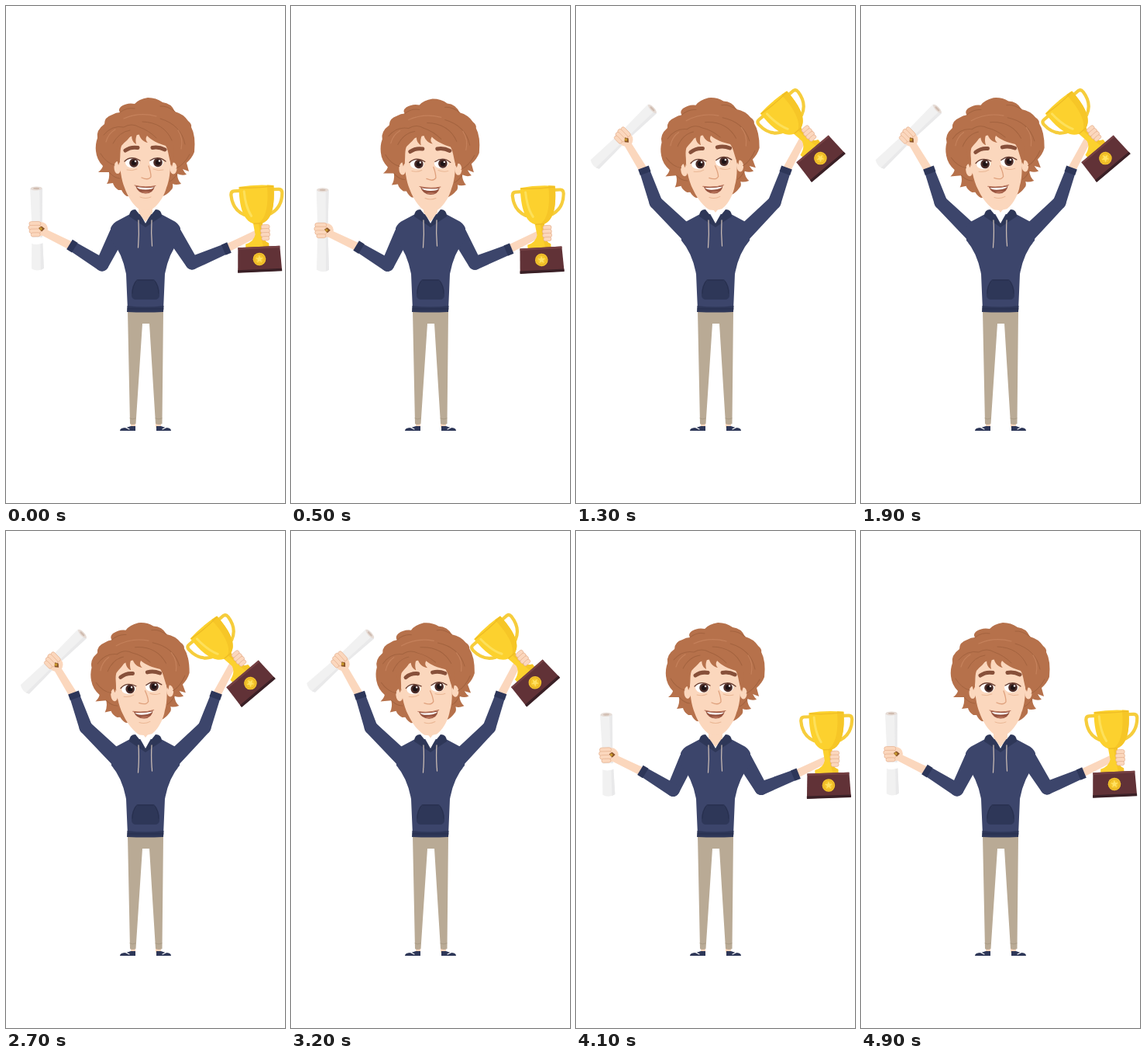
Recreate the animation shown at these times as an HTML page. Size 360 by 640 pixels, loop 5 s.

```html
<!DOCTYPE html>
<html lang="en">
<head>
<meta charset="utf-8">
<title>Celebration</title>
<style>
  html, body { margin: 0; width: 100%; height: 100%; overflow: hidden; background: #fff; }
  svg { display: block; width: 360px; height: 640px; }
  .skin { fill: #fbd7bd; }
  .cloth { fill: #3c456b; }
  .dark { fill: #2e3758; }
  .hair { fill: #b6714b; }
  .gold { fill: #fcd12e; }
  .line { fill: none; stroke-linecap: round; stroke-linejoin: round; }
  .cuff { stroke: #2d3659; stroke-width: 14.5; }
  .finger { fill: #fbd7bd; stroke: #e5b08f; stroke-width: .7; }
</style>
</head>
<body>
<svg viewBox="0 0 360 640">
  <g id="legs">
    <path class="skin" d="M161 536h6v7h-6zM193 536h7v7h-7z"/>
    <path fill="#b9aa95" d="M157 392H203L201.500 538Q197 540 193 538L185 409H176L167.500 538Q163 540 160 538Z"/>
    <path class="line" stroke="#a89983" stroke-width=".9" d="M160 531Q163 533 167 531M193 531Q197 533 201 531"/>
    <path class="dark" d="M147 547Q147 543 155 543L161 541H167V547ZM213 547Q213 543 206 543L200 541H194V547Z"/>
    <path class="line" stroke="#fff" stroke-width="1.100" d="M154 542.500L159 545M207 542.500L202 545"/>
  </g>

  <path id="wristL" class="skin"/>
  <path id="wristR" class="skin"/>
  <ellipse id="palmR" class="skin" cx="6" rx="9" ry="10"/>
  <g id="sleeves" class="cloth">
    <path id="upL"/><path id="foreL"/><path id="upR"/><path id="foreR"/>
  </g>
  <path id="cuffL" class="cuff"/>
  <path id="cuffR" class="cuff"/>

  <g id="torso">
    <path class="cloth" d="M160 268L145 276Q138 279 135 286L136 302Q150 318 155 345L157 392H203L205 345Q210 318 224 302L225 286Q222 279 215 276L200 268Z"/>
    <path class="dark" d="M156.500 386Q180 389 203.500 386L203 394Q180 395 156 394ZM169 352H191Q198 359 198 372Q198 378 192 378H168Q162 378 162 372Q162 359 169 352Z"/>
    <path class="line" stroke="#252d4b" stroke-width=".8" d="M168 354Q163 361 163 370M192 354Q197 361 197 370M170 353H190M157 390H203"/>
    <path class="dark" d="M159 271Q159 262 167 262L180 278L193 262Q201 262 201 271Q190 278 180 285Q170 278 159 271Z"/>
    <path fill="#fff" d="M170 262H190L180 280Z"/>
    <path id="neck" class="skin" d="M171 255H189V266L180 278L171 266Z"/>
    <path class="line" stroke="#c8bab3" stroke-width="1.300" d="M171 276Q172 294 170.500 311M188 276Q187 292 188.500 309"/>
  </g>

  <g id="head">
    <path class="hair" d="M156 245Q152 243 149 237L145 237Q139 233 138 228L130 229Q134 223 133 214L127 214L119 214Q124 210 125 206Q117 198 116 187Q115 178 118 170Q116 160 127 152Q127 143 137 140Q142 137 147 137Q144 133 149 129Q157 124 166 126Q171 120 183 118Q194 118 202 124Q213 125 218 136Q229 139 235 148Q240 152 239 156Q245 167 243 188Q240 196 233 202L236 213L228 210Q230 214 233 217Q227 219 221 216Q221 224 226 229Q219 231 215 229Q216 235 213 237Q208 243 202 245Z"/>
    <ellipse class="skin" cx="144" cy="208" rx="4.500" ry="8"/>
    <ellipse class="skin" cx="216" cy="209" rx="4.500" ry="7.500"/>
    <path class="skin" d="M147 180C146 205 148 222 153 234C158 248 166 258 172 262Q180 264 188 262C195 258 204 246 207 234C212 222 213 205 212 180C205 160 155 160 147 180Z"/>
    <path class="hair" d="M145 205C149 198 146 188 149 180C153 175 160 171 163 163C161 170 163 175 168 178C167 173 167 168 171 162C172 170 177 175 183 176C180 173 180 170 182 167C188 173 196 177 206 180C210 186 210 198 214 207C220 190 218 165 200 155C180 145 155 150 146 164C142 178 142 195 145 205Z"/>
    <path class="line" stroke="#a3633f" stroke-width="1" d="M147 137Q156 130 166 132M218 136Q208 128 199 129M126 166Q137 153 152 156Q162 150 172 156Q184 160 194 170M138 177Q146 162 160 160M176 149Q204 150 214 173M199 145Q226 153 231 178M122 190Q129 202 140 205M237 191Q230 204 220 209M133 214Q140 222 147 222M221 216Q216 224 211 226"/>
    <path class="line" stroke="#c5815b" stroke-width="1.200" d="M152 145Q172 136 194 142M129 175Q132 164 141 159M222 160Q229 170 226 184"/>
    <path class="line" stroke="#87503a" stroke-width="5" d="M154 186Q161 181 170 182.500M189 182.500Q197 181 205 185"/>
    <g id="eyeL">
      <ellipse cx="163" cy="202" rx="9" ry="6.300" fill="#fff"/>
      <circle cx="165" cy="202" r="5.800" fill="#4b2c28"/>
      <circle cx="165" cy="202" r="3.200" fill="#1f1416"/>
      <circle cx="167" cy="200" r="1.200" fill="#fff"/>
    </g>
    <use href="#eyeL" x="31" y="-.5"/>
    <path class="line" stroke="#6a3f32" stroke-width="1.300" d="M153 200Q161 192 173 199M186 199Q196 192 206 200"/>
    <path class="line" stroke="#eab795" stroke-width="1" d="M156 211Q163 213 169 210M190 210Q197 213 203 211M173 246Q180 249 187 246"/>
    <path class="line" stroke="#dfa17d" stroke-width="1.300" d="M184 206Q187 214 187 220Q184 225 175 221"/>
    <path fill="#96533f" d="M167 231.500Q180 234 192 232Q190 241.500 180 241.500Q170 241 167 231.500Z"/>
    <path fill="#fff" d="M168.500 233Q180 235 191 233.500Q189 236.500 180 236.500Q171 236.500 168.500 233Z"/>
    <path fill="#bb755c" d="M174 239.500Q180 238 187 239.500Q180 242 174 239.500Z"/>
    <path class="line" stroke="#b9745c" stroke-width="1" d="M166 231Q180 234.500 193 231.500"/>
  </g>

  <g id="scroll">
    <path fill="#f1f1f1" d="M-8 -52Q0 -56 8 -52L6.500 0L8 51Q0 56 -8 51L-6.500 0Z"/>
    <path fill="#e9e9ea" d="M4 -52L8 -52L6.500 0L8 51L4 53Z"/>
    <ellipse cy="-52" rx="7.500" ry="2.600" fill="#e6dcd6"/>
    <ellipse cy="-52" rx="4" ry="1.200" fill="#d0bcb0"/>
    <path id="gap" fill="#fff" d="M-9 11H9V18Q0 22 -9 18Z"/>
    <ellipse class="skin" cx="5" rx="9" ry="9"/>
    <g class="finger">
      <rect x="-10" y="-9.500" width="15" height="5.500" rx="2.700"/>
      <rect x="-11" y="-4.700" width="16" height="5.500" rx="2.700"/>
      <rect x="-10" y="0" width="15" height="5.500" rx="2.700"/>
      <rect x="-8" y="4.800" width="12" height="5" rx="2.500"/>
    </g>
    <path fill="#8a5328" d="M2 -1L6 -3.500L10 0L6 3.500Z"/>
    <circle cx="5" r="1.800" fill="#c99a2f"/>
  </g>

  <g id="trophy">
    <path class="line" stroke="#f6cd3c" stroke-width="4.200" d="M-21 -55H-29Q-33 -55 -33 -50Q-32 -31 -17 -24M21 -55H29Q33 -55 33 -50Q32 -31 17 -24"/>
    <path class="gold" d="M-22.500 -60Q0 -63 22.500 -60C23 -38 20 -17 6 -12L4 2Q6 11 13 14V19H-17V14Q-6 11 -4 2L-6 -12C-20 -17 -23 -38 -22.500 -60Z"/>
    <path fill="#f6c627" d="M14 -61L22.500 -60C23 -38 20 -17 6 -12L4 2Q6 11 13 14V19H6Q3 6 1 -12C13 -20 15 -42 14 -61Z"/>
    <path class="line" stroke="#fde05a" stroke-width="3" d="M-16 -54Q-15 -34 -8 -22"/>
    <path class="line" stroke="#efbd24" stroke-width="1.400" d="M-21 -59Q0 -57 21 -59M-5 -12H5"/>
    <path fill="#613237" d="M-27 18H27L28.500 50H-28.500Z"/>
    <path fill="#764144" d="M-27 18H27V20.500H-27Z"/>
    <path fill="#3a2026" d="M-28.500 47H28.500V50.500H-28.500Z"/>
    <circle cy="34" r="8.300" fill="#f5c62c"/>
    <circle class="line" cy="34" r="6.500" stroke="#e0a924" stroke-width=".8"/>
    <path id="star" fill="#ffe162"/>
    <g class="finger">
      <rect x="4" y="-10" width="11" height="5.600" rx="2.700"/>
      <rect x="3" y="-5" width="12" height="5.600" rx="2.700"/>
      <rect x="3" y="0" width="12" height="5.600" rx="2.700"/>
      <rect x="4" y="5" width="10" height="5.200" rx="2.500"/>
    </g>
  </g>
</svg>
<script>
const $ = id => document.getElementById(id);
const LOOP = 5000, STEP = 100, RAD = Math.PI / 180;
const SHOULDER = { L: [144, 293], R: [216, 293] };

// Turns elbow, wrist, grip into angle and length pairs.
function chain(start, points, wrap) {
  let [x, y] = start;
  return points.flatMap(([px, py]) => {
    const dx = px - x, dy = py - y;
    const deg = Math.atan2(dy, dx) / RAD;
    [x, y] = [px, py];
    return [wrap ? (deg + 360) % 360 : deg, Math.hypot(dx, dy)];
  });
}

// extra: scroll angle, trophy angle, head angle, head drop, scroll gap
const pose = (left, right, extra) =>
  [...chain(SHOULDER.L, left, true), ...chain(SHOULDER.R, right), ...extra];
const mix = (a, b, k) => a.map((v, i) => v + (b[i] - v) * k);

const rest = pose([[124, 333], [82, 307], [40, 287]],
                  [[240, 331], [288, 311], [325.5, 292]], [-1, -2.5, 0, 0, 1]);
const dip = pose([[127, 334], [86, 310], [42.5, 291]],
                 [[235, 332], [283, 314], [320, 295.5]], [-1.5, -2, 0, 1.5, 0]);
const up = pose([[103, 253], [87, 208], [61, 168.5]],
                [[256, 253], [272, 208], [293.5, 170]], [46, -40, -5, 0, 0]);
const lean = pose([[104, 254], [93, 208], [74.5, 164]],
                  [[255, 253], [269, 207], [288, 168]], [55, -46, -4, 1, 0]);

const keys = [
  [0, rest], [450, dip], [960, mix(dip, up, 1.04)], [1280, up], [3050, up],
  [3600, lean], [4120, mix(lean, rest, 1.02)], [4500, rest], [LOOP, rest]
];

function poseAt(t) {
  const i = keys.findIndex(([end], n) => n && t < end);
  const [t0, a] = keys[i - 1], [t1, b] = keys[i];
  const p = (t - t0) / (t1 - t0);
  return mix(a, b, p * p * (3 - 2 * p));
}

function joints(start, c) {
  let [x, y] = start;
  return [0, 2, 4].map(i => {
    x += Math.cos(c[i] * RAD) * c[i + 1];
    y += Math.sin(c[i] * RAD) * c[i + 1];
    return [x, y];
  });
}

const toward = (a, b, d) => {
  const len = Math.hypot(b[0] - a[0], b[1] - a[1]);
  return [a[0] + (b[0] - a[0]) * d / len, a[1] + (b[1] - a[1]) * d / len];
};

// Tapered capsule from a to b.
function limb(id, a, ra, b, rb) {
  const len = Math.hypot(b[0] - a[0], b[1] - a[1]);
  const nx = (a[1] - b[1]) / len, ny = (b[0] - a[0]) / len;
  const at = (p, r) => `${p[0] + nx * r} ${p[1] + ny * r}`;
  $(id).setAttribute('d', `M${at(a, ra)}L${at(b, rb)}A${rb} ${rb} 0 0 0 ${at(b, -rb)}` +
    `L${at(a, -ra)}A${ra} ${ra} 0 0 0 ${at(a, ra)}Z`);
}

function arm(side, [elbow, wrist, grip]) {
  const inner = toward(wrist, elbow, 8);
  limb('up' + side, SHOULDER[side], 10.5, elbow, 8.5);
  limb('fore' + side, elbow, 8.5, inner, 6.8);
  limb('wrist' + side, inner, 5.5, grip, 4.5);
  $('cuff' + side).setAttribute('d', `M${inner}L${wrist}`);
}

const place = (id, [x, y], deg) =>
  $(id).setAttribute('transform', `translate(${x} ${y}) rotate(${deg})`);

function draw(t) {
  const p = poseAt(t);
  const left = joints(SHOULDER.L, p.slice(0, 6));
  const right = joints(SHOULDER.R, p.slice(6, 12));
  const [scroll, trophy, turn, drop, gap] = p.slice(12);
  arm('L', left);
  arm('R', right);
  place('scroll', left[2], scroll);
  place('trophy', right[2], trophy);
  place('palmR', right[2], trophy);
  place('neck', [0, turn * 2.4], 0);
  $('gap').setAttribute('opacity', Math.max(0, Math.min(1, gap)));
  $('head').setAttribute('transform', `translate(0 ${drop}) rotate(${turn} 179 258)`);
}

$('star').setAttribute('d', 'M' + Array.from({ length: 10 }, (_, i) => {
  const r = i % 2 ? 2.3 : 5.2, a = i * 36 * RAD;
  return `${r * Math.sin(a)} ${34 - r * Math.cos(a)}`;
}).join('L') + 'Z');

const begin = performance.now();
function tick() {
  const t = (performance.now() - begin) % LOOP;
  draw(Math.floor(t / STEP) * STEP);
  requestAnimationFrame(tick);
}
tick();
</script>
</body>
</html>
```
